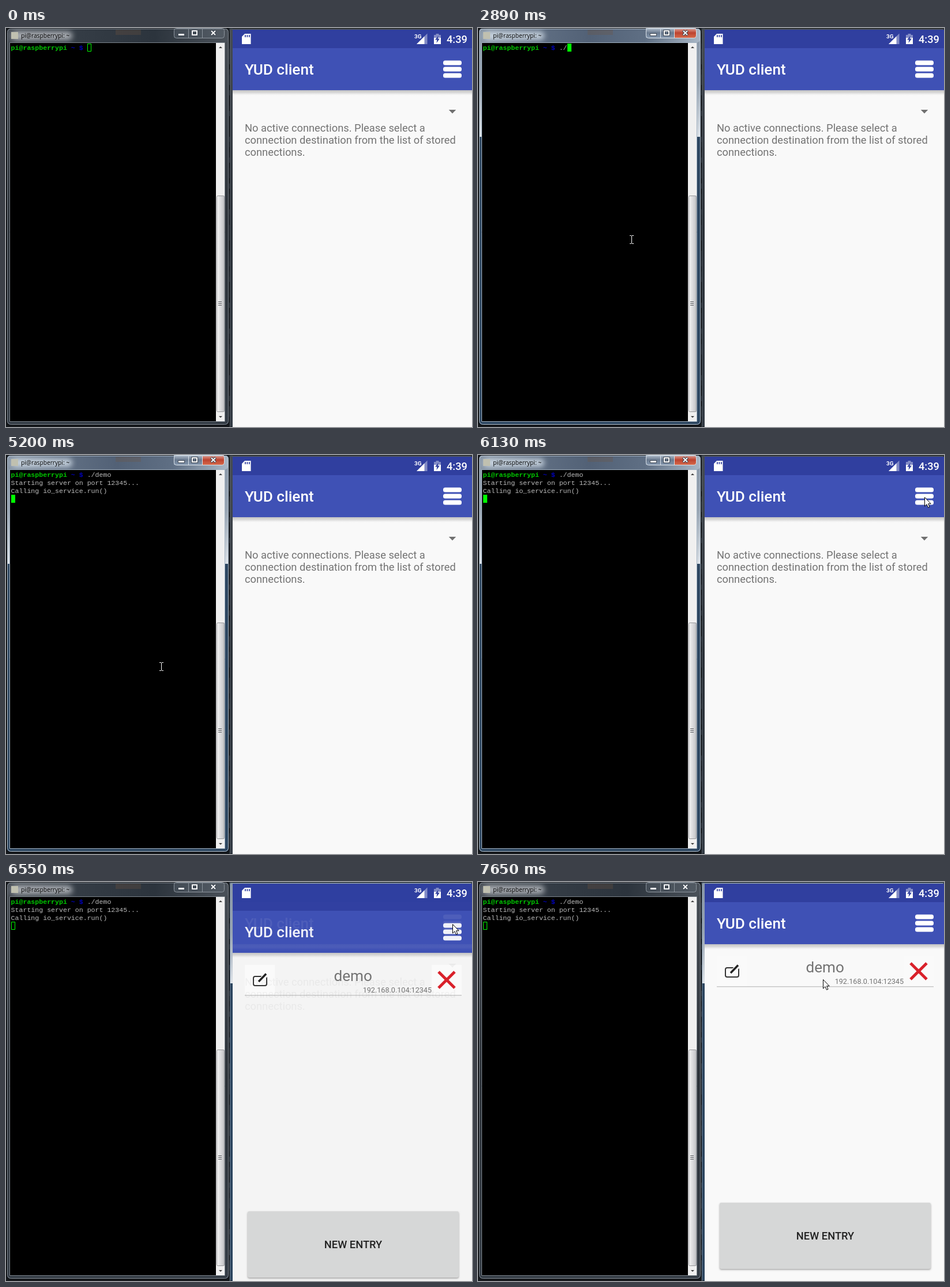
An HTML page with a canvas that plays this animation: 808 px wide and 693 px high, repeating every 8 s.

```html
<!DOCTYPE html>
<html lang="en">
<head>
<meta charset="utf-8">
<title>Terminal and phone client</title>
<style>
  html, body { margin: 0; width: 100%; height: 100%; overflow: hidden; background: #14171b; }
  canvas { display: block; }
</style>
</head>
<body>
<canvas id="stage" width="808" height="693"></canvas>
<script>
const ctx = document.getElementById('stage').getContext('2d');
const LOOP = 8000, FOCUS = 1040, BLUR = 6250, SLIDE = 6550, LIST = 6710;
const TICK = 133, CELL = 6.95, ROW = 14, SPLIT = 364, LEFT = 393;
const INDIGO = '#3f51b5', DARK_INDIGO = '#303f9f', GREY = '#737373';

// Pointer moves: start, end, destination x, y
const MOVES = [
  [500, 500, 634, 616], [500, 900, 256, 287], [1040, 1190, 266, 367],
  [5070, 5200, 269, 367], [5200, 5710, 741, 158], [5710, 6130, 774, 73], [6880, 7650, 598, 169]
];

const smooth = p => p * p * (3 - 2 * p);
const mix = (a, b, p) => a + (b - a) * p;
const sp = (size, weight = 400) => `${weight} ${size * 1.307}px Roboto, sans-serif`;

function rect(color, x, y, w, h, r = 0) {
  ctx.fillStyle = color;
  ctx.beginPath();
  ctx.roundRect(x, y, w, h, r);
  ctx.fill();
}

function outline(color, x, y, w, h, r = 0, width = 1) {
  ctx.strokeStyle = color;
  ctx.lineWidth = width;
  ctx.beginPath();
  ctx.roundRect(x + width / 2, y + width / 2, w - width, h - width, r);
  ctx.stroke();
}

function poly(color, ...points) {
  ctx.fillStyle = color;
  ctx.beginPath();
  for (let i = 0; i < points.length; i += 2) ctx.lineTo(points[i], points[i + 1]);
  ctx.closePath();
  ctx.fill();
}

function line(color, width, x0, y0, x1, y1) {
  ctx.strokeStyle = color;
  ctx.lineWidth = width;
  ctx.beginPath();
  ctx.moveTo(x0, y0);
  ctx.lineTo(x1, y1);
  ctx.stroke();
}

function cross(color, width, x, y, r) {
  line(color, width, x - r, y - r, x + r, y + r);
  line(color, width, x - r, y + r, x + r, y - r);
}

// Triangle with its base centred on x, y and its tip h away
const triangle = (color, x, y, w, h) => poly(color, x - w / 2, y, x + w / 2, y, x, y + h);

function text(str, x, y, font, color, align = 'left') {
  ctx.font = font;
  ctx.fillStyle = color;
  ctx.textAlign = align;
  ctx.fillText(str, x, y);
}

// Evenly spaced colours from one point to another
function fade(x0, y0, x1, y1, ...colors) {
  const g = ctx.createLinearGradient(x0, y0, x1, y1);
  colors.forEach((color, i) => g.addColorStop(i / (colors.length - 1), color));
  return g;
}

function desktop() {
  rect('#14171b', 0, 0, 808, 693);
  for (let y = 0; y < 693; y += 9) {
    rect(`hsl(212 18% ${15 + 7 * Math.sin(y * y)}%)`, 386, y, 7, 9);
  }
}

// Glass window edge; a focused one mirrors a bright area above the fold
function glass(active, x, y, w, h, fold) {
  rect(active ? '#2d4660' : fade(0, y, 0, y + h, '#474d54', '#2b3138', '#343c45'), x, y, w, h, 5);
  if (active) rect(fade(0, y, 0, fold, '#8997a7', '#98a5b3', '#dce2e8'), x, y, w, fold - y, [5, 5, 0, 0]);
}

function windowButtons(active) {
  const edge = active ? '#dbe2e9' : '#8c949d', ink = '#3d4652';
  const plain = active ? fade(0, 0, 0, 17, '#b3bfcd', '#6a7a8f', '#8295ac') : 'rgba(110,120,132,.25)';
  const close = active ? fade(0, 0, 0, 17, '#e2aaa0', '#bd4330', '#d5694b') : plain;
  rect(plain, 291, 0, 49, 17);
  rect(close, 340, 0, 38, 17);
  outline(edge, 291, 0, 88, 18, 4);
  for (const x of [316.5, 340.5]) line(edge, 1, x, 1, x, 17);

  rect(ink, 298, 9, 12, 5, 1);
  rect('#fff', 299, 10, 10, 3);
  outline(ink, 321, 3, 12, 11, 0, 4);
  outline('#fff', 322, 4, 10, 9, 0, 2);
  cross(ink, 4, 359.5, 8.5, 4);
  cross('#fff', 2, 359.5, 8.5, 3.5);
}

function titleBar(active) {
  rect(active
    ? fade(2, 0, 385, 0, '#8997a7', '#617084', '#526176', '#5f6f84', '#a9b7c6')
    : fade(2, 0, 385, 0, '#4a5058', '#343c45', '#2c343d', '#4a5159'), 3, 2, 382, 23, 5);
  rect('rgba(110,85,65,.3)', 190, 3, 44, 9);
  ctx.filter = 'blur(5px)';
  rect(active ? 'rgba(225,235,245,.75)' : 'rgba(215,218,222,.7)', 10, 6, 105, 15, 7);
  ctx.filter = 'none';
  rect('#c0c0b0', 9, 7, 12, 12);
  text('pi@raspberrypi: ~', 26, 17, '10.2px "Open Sans", sans-serif', '#000');
  windowButtons(active);
}

function scrollBar() {
  rect('#f0f0f0', SPLIT, 26, 15, 657);
  triangle('#404040', 372, 35, 6, -3);
  triangle('#404040', 372, 674, 6, 3);
  rect(fade(365, 0, 379, 0, '#f5f5f5', '#dcdcde', '#bfc0c3'), 365, 291, 14, 376, 2);
  outline('#96979a', 365, 291, 14, 376, 2);
  for (let i = 0; i < 3; i++) rect('#55585c', 368, 475 + i * 3, 6, 1);
}

function put(str, col, row, color, weight = 400) {
  [...str].forEach((ch, i) => text(ch, 8.6 + (col + i) * CELL, 37.5 + row * ROW,
    weight + ' 11.6px "Liberation Mono", monospace', color));
}

function typedCount(t) {
  if (t < 2890) return 0;
  return t < 3270 ? 2 : Math.min(6, 3 + Math.floor((t - 3270) / 130));
}

function shell(t, active) {
  const typed = typedCount(t);
  put('pi@raspberrypi', 0, 0, '#00c800', 700);
  put('~ $', 15, 0, '#0000bb', 700);
  put('./demo'.slice(0, typed), 19, 0, '#bbb');
  const row = t < 4210 ? 0 : t < 4370 ? 1 : 3;
  if (row === 3) {
    put('Starting server on port 12345...', 0, 1, '#bbb');
    put('Calling io_service.run()', 0, 2, '#bbb');
  }
  const x = Math.round(8.7 + (row ? 0 : 19 + typed) * CELL);
  (active ? rect : outline)('#0f0', x, 27 + row * ROW, 7, ROW);
}

function terminal(t) {
  const active = t >= FOCUS && t < BLUR;
  rect('#0b0d10', 1, 0, 386, 690, 6);
  glass(active, 2, 1, 384, 688, 189);
  titleBar(active);
  outline(active ? '#b9c7d5' : '#858d96', 2, 1, 384, 688, 6);
  outline(active ? '#a0b0c0' : '#7c848c', 6, 25, 374, 659);
  rect('#000', 7, 26, SPLIT - 7, 657);
  scrollBar();
  shell(t, active);
}

function toolbar() {
  rect(fade(0, 108, 0, 118, '#c2c2c2', '#dedede', 'rgba(249,249,249,0)'), LEFT, 108, 415, 10);
  rect(DARK_INDIGO, LEFT, 3, 415, 32);
  rect(INDIGO, LEFT, 35, 415, 73);
  text('YUD client', 414, 81, sp(20, 500), '#fff');
  for (let i = 0; i < 3; i++) rect('#fff', 758, 56.5 + i * 11, 32, 8, 3.5);
}

function emptyScreen() {
  toolbar();
  triangle('#707070', 774, 142, 12.5, 6.5);
  ['No active connections. Please select a',
   'connection destination from the list of stored',
   'connections.'].forEach((str, i) => text(str, 414, 180 + i * 21, sp(14), GREY));
}

function listScreen() {
  toolbar();
  for (const x of [414, 738]) rect('#fafafa', x, 129, 52, 52);
  rect('#c8c8c8', 414, 181, 376, 1.5);

  outline('#333', 428, 148, 25, 18, 3, 2);
  line('#fafafa', 8, 441, 156, 453, 144);
  line('#222', 3.5, 438, 158, 451, 144.5);

  text('demo', 601.7, 157, sp(20), GREY, 'center');
  text('192.168.0.104:12345', 738, 177, sp(9.65), GREY, 'right');
  cross('#d9202a', 5, 764, 155, 14);

  ctx.shadowColor = 'rgba(0,0,0,.35)';
  ctx.shadowBlur = 3;
  ctx.shadowOffsetY = 1.5;
  rect('#d6d7d7', 419, 557, 366, 115, 3);
  ctx.shadowColor = 'transparent';
  text('NEW ENTRY', 602, 621, sp(14, 500), '#212121', 'center');
}

function statusIcons() {
  const dim = 'rgba(255,255,255,.4)';
  poly('#fff', 414, 10, 424.5, 10, 424.5, 28, 409, 28, 409, 15);
  for (let i = 0; i < 3; i++) rect(DARK_INDIGO, 414 + i * 3.5, 12, 1.7, 4);
  text('3G', 708, 18, sp(7.6, 700), '#fff');
  poly(dim, 712, 28, 730.5, 28, 730.5, 9.5);
  poly('#fff', 712, 28, 725.5, 28, 725.5, 14.5);
  rect(dim, 745.5, 10, 5, 2);
  rect(dim, 742, 12, 12, 5);
  rect('#fff', 742, 17, 12, 11);
  poly(DARK_INDIGO, 749.5, 13.5, 744, 20.5, 747.3, 20.5, 746.5, 26, 752, 18.5, 748.8, 18.5);
  text('4:39', 800, 26, sp(14, 500), '#fff', 'right');
}

function phone(t) {
  const active = t >= BLUR, sliding = t >= SLIDE && t < LIST;
  glass(active, 388, 1, 420, 692, 176);
  outline(active ? '#6f8193' : '#50575f', 388, 1, 424, 700);

  ctx.save();
  ctx.beginPath();
  ctx.rect(LEFT, 3, 415, 690);
  ctx.clip();
  rect(sliding ? '#f4f4f4' : '#f9f9f9', LEFT, 3, 415, 690);
  if (t < SLIDE) emptyScreen();
  else {
    const drop = sliding ? 15 : 0;
    rect(DARK_INDIGO, LEFT, 3, 415, drop);
    ctx.translate(0, drop);
    listScreen();
  }
  if (sliding) {
    ctx.translate(0, -15);
    ctx.globalAlpha = .08;
    emptyScreen();
  }
  ctx.restore();
  statusIcons();
}

function pointerAt(t) {
  let [, , x, y] = MOVES[0];
  for (const [start, end, toX, toY] of MOVES) {
    if (t < start) break;
    const steps = Math.max(1, Math.round((end - start) / TICK));
    const p = t >= end ? 1 : smooth(Math.floor((t - start) / (end - start) * steps) / steps);
    x = mix(x, toX, p);
    y = mix(y, toY, p);
  }
  return [x, y];
}

function pointer(t) {
  if (t < MOVES[0][0]) return;
  const [x, y] = pointerAt(t);
  ctx.save();
  ctx.translate(Math.round(x), Math.round(y));
  if (x < SPLIT) {
    rect('#fff', 0, -6, 1, 13);
    for (const end of [-7, 7]) {
      rect('#fff', -3, end, 3, 1);
      rect('#fff', 1, end, 3, 1);
    }
  } else {
    poly('#fff', .5, .5, .5, 16, 4, 12.7, 6.5, 18.3, 9, 17.2, 6.6, 11.7, 11.2, 11.7);
    ctx.strokeStyle = '#000';
    ctx.lineWidth = 1;
    ctx.stroke();
  }
  ctx.restore();
}

function draw() {
  const t = performance.now() % LOOP;
  desktop();
  terminal(t);
  phone(t);
  pointer(t);
  requestAnimationFrame(draw);
}
draw();
</script>
</body>
</html>
```
